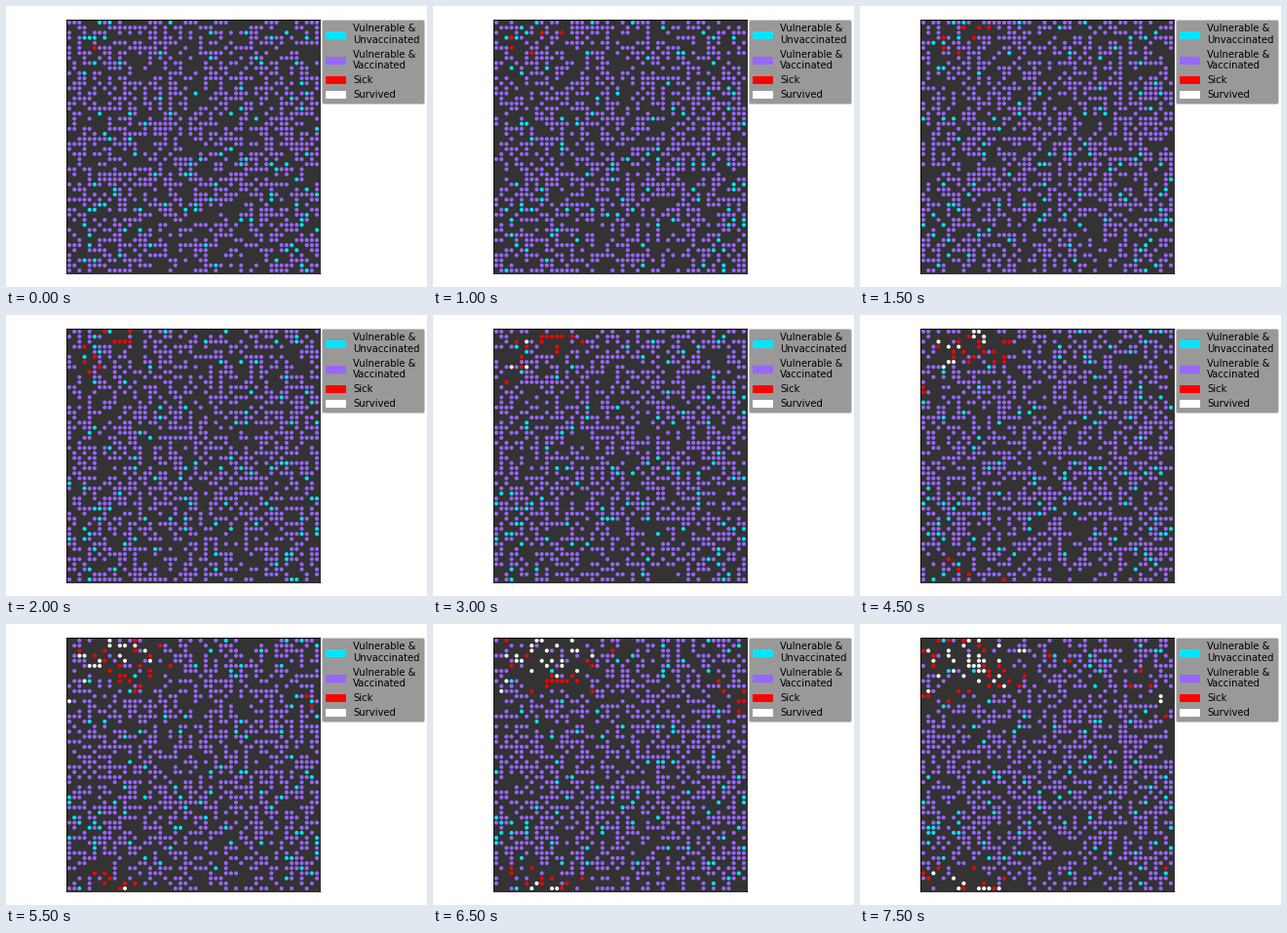
Write a matplotlib script that moves like this. It is 432 px wide and 288 px high and loops after 8000 ms.

```python
import random
import matplotlib.pyplot as plt
from matplotlib.animation import FuncAnimation
from matplotlib.patches import Patch

W, H, DPI = 432, 288, 72
N = 50                  # cells per side, edges wrap
TICKS, STEP_MS = 16, 500
PEOPLE, UNVACCINATED = 1190, 95
FIRST_CASE = (5, 5)
SICK_TICKS = 5
DEATH_RATE = 0.1
CYAN, PURPLE, RED, WHITE = "#00e5ff", "#9966ff", "#ff0000", "#ffffff"

rng = random.Random(7)
MOVES = [(dx, dy) for dx in (-1, 0, 1) for dy in (-1, 0, 1)]


class Person:
    def __init__(self, cell, base):
        self.cell, self.base, self.since = cell, base, None

    def color(self, t):
        if self.since is None:
            return self.base
        return RED if t < self.since + SICK_TICKS else WHITE

    def walk(self, taken):
        """Move to a random free neighbouring cell, or stay."""
        x, y = self.cell
        taken.discard(self.cell)
        spots = [((x + dx) % N, (y + dy) % N) for dx, dy in MOVES]
        self.cell = rng.choice([s for s in spots if s not in taken])
        taken.add(self.cell)


def near(a, b, reach_x, reach_y):
    dx, dy = (min((p - q) % N, (q - p) % N) for p, q in zip(a.cell, b.cell))
    return dx <= reach_x and dy <= reach_y


def total_cases(t):
    return round(1 + 1.4 * t + 0.25 * t * t)


def infect(people, sick, count, t):
    """Each new case catches it from a random sick person nearby."""
    for _ in range(count):
        source = rng.choice(sick)
        exposed = [p for p in people
                   if p.since is None and near(p, source, 4, 2)]
        if exposed:
            rng.choice(exposed).since = t


def simulate():
    cells = [(x, y) for x in range(N) for y in range(N)
             if (x, y) != FIRST_CASE]
    people = [Person(cell, CYAN if i < UNVACCINATED else PURPLE)
              for i, cell in enumerate(rng.sample(cells, PEOPLE))]
    people.append(Person(FIRST_CASE, PURPLE))
    people[-1].since = 0

    states = []
    for t in range(TICKS):
        if t:
            taken = {p.cell for p in people}
            rng.shuffle(people)
            for p in people:
                p.walk(taken)
            sick = [p for p in people if p.color(t) == RED]
            infect(people, sick, total_cases(t) - total_cases(t - 1), t)
            # The crowd thins out around the sick.
            people = [p for p in people
                      if p.since is not None or rng.random() > DEATH_RATE
                      or not any(near(p, s, 2, 2) for s in sick)]
        states.append([(p.cell, p.color(t)) for p in people])
    return states


states = simulate()

plt.rcParams["font.family"] = "DejaVu Sans"
fig = plt.figure(figsize=(W / DPI, H / DPI), dpi=DPI, facecolor="white")
ax = fig.add_axes([62.4 / W, 14.4 / H, 259.2 / W, 259.2 / H])
ax.set(xlim=(-0.5, N - 0.5), ylim=(N - 0.5, -0.5), xticks=[], yticks=[],
       facecolor="#333333")
dots = ax.scatter([], [], s=16.5, linewidths=0)

entries = [("Vulnerable &\nUnvaccinated", CYAN),
           ("Vulnerable &\nVaccinated", PURPLE),
           ("Sick", RED), ("Survived", WHITE)]
ax.legend(handles=[Patch(color=c, label=name) for name, c in entries],
          loc="upper left", bbox_to_anchor=(324.2 / W, 1 - 14 / H),
          bbox_transform=fig.transFigure, borderaxespad=0,
          fontsize=10, facecolor="gray", framealpha=0.8)


def draw(t):
    cells, colors = zip(*states[t])
    dots.set_offsets(cells)
    dots.set_facecolors(colors)
    return dots,


anim = FuncAnimation(fig, draw, frames=TICKS, interval=STEP_MS,
                     repeat=True, repeat_delay=0)
plt.show()
```
